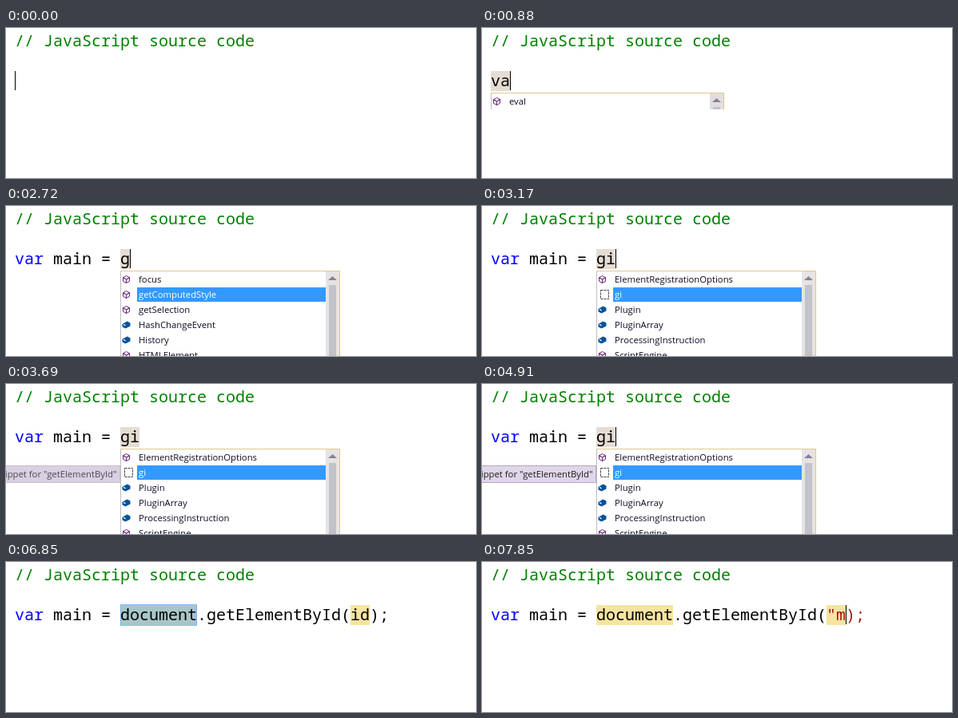
These frames come from a looping animation (588 by 188 pixels, 8 s). An HTML page with a canvas:

```html
<!DOCTYPE html>
<html lang="en">
<head>
<meta charset="utf-8">
<title>Snippet typing</title>
<style>
  html, body { margin: 0; width: 100%; height: 100%; overflow: hidden; background: #fff; }
  canvas { display: block; }
</style>
</head>
<body>
<canvas id="stage" width="588" height="188"></canvas>
<script>
const ctx = document.getElementById('stage').getContext('2d', { alpha: false });
const LOOP = 8000, LEFT = 11, CELL = 12, ROW = 19;
const CODE_FONT = '500 20px "Noto Sans Mono", monospace';
const UI_FONT = '11.3px "Open Sans", "Noto Sans", sans-serif';
const PURPLE = '#68217a', BLUE = '#00539c', INK = '#0c0c28';

const colX = col => LEFT + col * CELL;

// Completion lists: each row is [icon, label].
const varList = {
  x: 11, w: 292, selected: 3, track: '#e3dedd',
  rows: [['cube', 'eval'], ['cube', 'EvalError'], ['brick', 'HTMLCanvasElement'],
         ['box', 'var'], ['brick', 'ValidityState'], ['cube', 'valueOf']]
};
const gList = {
  x: 143, w: 275, selected: 1, track: '#e6e3e3',
  rows: [['cube', 'focus'], ['cube', 'getComputedStyle'], ['cube', 'getSelection'],
         ['brick', 'HashChangeEvent'], ['brick', 'History'], ['cube', 'HTMLElement']]
};
const giList = {
  x: 143, w: 275, selected: 1, track: '#e6e3e3',
  rows: [['cube', 'ElementRegistrationOptions'], ['box', 'gi'], ['brick', 'Plugin'],
         ['brick', 'PluginArray'], ['brick', 'ProcessingInstruction'], ['cube', 'ScriptEngine']]
};

const start = { text: '', caret: 0, on: true, word: null, fields: [], select: null, list: null, bottom: 188, tip: 0 };
const call = 'var main = document.getElementById(';
const word = (from, length) => ({ from, length });
const typed = (text, from) => ({ text, caret: text.length, on: true, word: word(from, text.length - from) });
const target = word(11, 8);

// Each cue changes part of the editor state at its time.
const cues = [
  [260, { on: false }],
  [460, typed('v', 0)],
  [620, typed('va', 0)],
  [850, { list: varList, bottom: 84 }],
  [880, { bottom: 102 }],
  [910, { bottom: 188 }],
  [960, { ...typed('var', 0), list: null }],
  [1000, { text: 'var ', caret: 4, word: null }],
  [1230, typed('var m', 4)],
  [1350, typed('var ma', 4)],
  [1450, typed('var mai', 4)],
  [1580, typed('var main', 4)],
  [1970, { text: 'var main ', caret: 9, word: null, on: false }],
  [2200, { text: 'var main =', caret: 10, on: true }],
  [2280, { on: false }],
  [2360, { text: 'var main = ', caret: 11, on: true }],
  [2560, typed('var main = g', 11)],
  [2660, { list: gList }],
  [2780, typed('var main = gi', 11)],
  [2850, { list: giList }],
  [2970, { on: false }],
  [3170, { on: true }],
  [3630, { on: false, tip: 0.25 }],
  [3660, { tip: 0.5 }],
  [3690, { tip: 0.75 }],
  [3720, { tip: 1 }],
  [3920, { on: true }],
  [4380, { on: false }],
  [4910, { on: true }],
  [5470, { on: false }],
  [5570, { tip: 0 }],
  [5670, { list: null }],
  [5900, { on: true }],
  [6030, { text: call + 'id);', caret: 19, word: null, fields: [target, word(35, 2)], select: target }],
  [6230, { on: false }],
  [6390, { on: true }],
  [6750, { on: false }],
  [7110, { select: null, caret: 37 }],
  [7170, { select: word(35, 2), on: true }],
  [7400, { text: call + '");', caret: 36, fields: [target, word(35, 1)], select: null }],
  [7630, { on: false }],
  [7790, { text: call + '"m);', caret: 37, fields: [target, word(35, 2)] }],
  [7850, { on: true }]
];

function stateAt(time) {
  const state = { ...start };
  for (const [at, change] of cues) if (at <= time) Object.assign(state, change);
  return state;
}

function rect(x, y, w, h, color) {
  ctx.fillStyle = color;
  ctx.fillRect(x, y, w, h);
}

function label(text, x, y, color, font) {
  ctx.font = font;
  ctx.fillStyle = color;
  ctx.fillText(text, x, y);
}

function path(points, fill, stroke) {
  ctx.beginPath();
  points.forEach(([x, y]) => ctx.lineTo(x, y));
  ctx.closePath();
  if (fill) { ctx.fillStyle = fill; ctx.fill(); }
  if (stroke) { ctx.strokeStyle = stroke; ctx.lineWidth = 1; ctx.stroke(); }
}

function shade({ from, length }, color) {
  rect(colX(from), 54, length * CELL, 25, color);
}

function drawSelection({ from, length }) {
  rect(colX(from), 53, length * CELL, 27, 'rgba(51,153,255,.4)');
  ctx.strokeStyle = 'rgba(51,153,255,.4)';
  ctx.lineWidth = 1;
  ctx.strokeRect(colX(from) + 0.5, 53.5, length * CELL - 1, 26);
}

function drawCode(text) {
  const keyword = text.startsWith('var') ? 3 : 0;
  const quote = text.indexOf('"');
  const plainEnd = quote < 0 ? text.length : quote;
  const piece = (from, to, color) => label(text.slice(from, to), colX(from), 73, color, CODE_FONT);
  piece(0, keyword, '#0000ff');
  piece(keyword, plainEnd, '#000');
  piece(plainEnd, text.length, '#a31515');
}

const icons = {
  cube(x, y) {
    path([[x, y - 4.5], [x + 4, y - 2.3], [x + 4, y + 2.3], [x, y + 4.5], [x - 4, y + 2.3], [x - 4, y - 2.3]], '#fff', PURPLE);
    path([[x - 4, y - 2.3], [x, y], [x + 4, y - 2.3], [x, y]], null, PURPLE);
    path([[x, y], [x, y + 4.5]], null, PURPLE);
  },
  brick(x, y) {
    path([[x - 5, y - 1], [x + 1, y - 4.5], [x + 5, y - 2.5], [x + 5, y + 1.5], [x - 1, y + 4.5], [x - 5, y + 2.5]], BLUE);
    path([[x - 3.5, y - 0.5], [x - 1, y + 0.8], [x - 1, y + 0.8]], null, '#fff');
  },
  box(x, y) {
    ctx.strokeStyle = '#424242';
    ctx.lineWidth = 1;
    ctx.setLineDash([3, 1]);
    ctx.strokeRect(x - 2, y - 5.5, 10, 11);
    ctx.setLineDash([]);
  }
};

function drawList({ x, w, selected, track, rows }, bottom) {
  ctx.save();
  ctx.beginPath();
  ctx.rect(x, 81, w, bottom - 81);
  ctx.clip();
  rect(x, 81, w, 110, '#dfc893');
  rect(x, 82, w - 1, 110, '#bfbfc6');
  rect(x + 1, 82, w - 2, 110, '#fff');

  rows.forEach(([icon, name], i) => {
    const mid = 92 + i * ROW, active = i === selected;
    if (active) rect(x + 21, mid - 9, w - 39, 18, '#3399ff');
    icons[icon](x + 7.5, mid);
    label(name, x + 23, mid + 4, active ? '#fff' : INK, UI_FONT);
  });

  const bar = x + w - 18;
  rect(bar, 82, 17, 110, track);
  rect(bar + 4, 99, 9, 100, '#c2c3c9');
  path([[bar + 3, 93], [bar + 8.5, 88], [bar + 14, 93]], '#86829a');
  ctx.restore();
}

function drawTip(alpha) {
  ctx.save();
  ctx.globalAlpha = alpha;
  rect(0, 102, 143, 22, '#b3a9bd');
  rect(0, 103, 142, 20, '#dfd6ea');
  ctx.textAlign = 'right';
  label('Code snippet for "getElementById"', 138.5, 117, '#1e1e1e', UI_FONT);
  ctx.restore();
}

function draw(time) {
  const s = stateAt(time);
  rect(0, 0, 588, 188, '#fff');
  label('// JavaScript source code', LEFT, 23, '#008000', CODE_FONT);
  if (s.word) shade(s.word, '#e5dcd3');
  s.fields.forEach(field => shade(field, '#f6e4a1'));
  if (s.select) drawSelection(s.select);
  drawCode(s.text);
  if (s.on) rect(colX(s.caret), 54, 1, 24, '#000');
  if (s.tip) drawTip(s.tip);
  if (s.list) drawList(s.list, s.bottom);
}

const began = performance.now();
function tick() {
  draw((performance.now() - began) % LOOP);
  requestAnimationFrame(tick);
}
tick();
</script>
</body>
</html>
```
